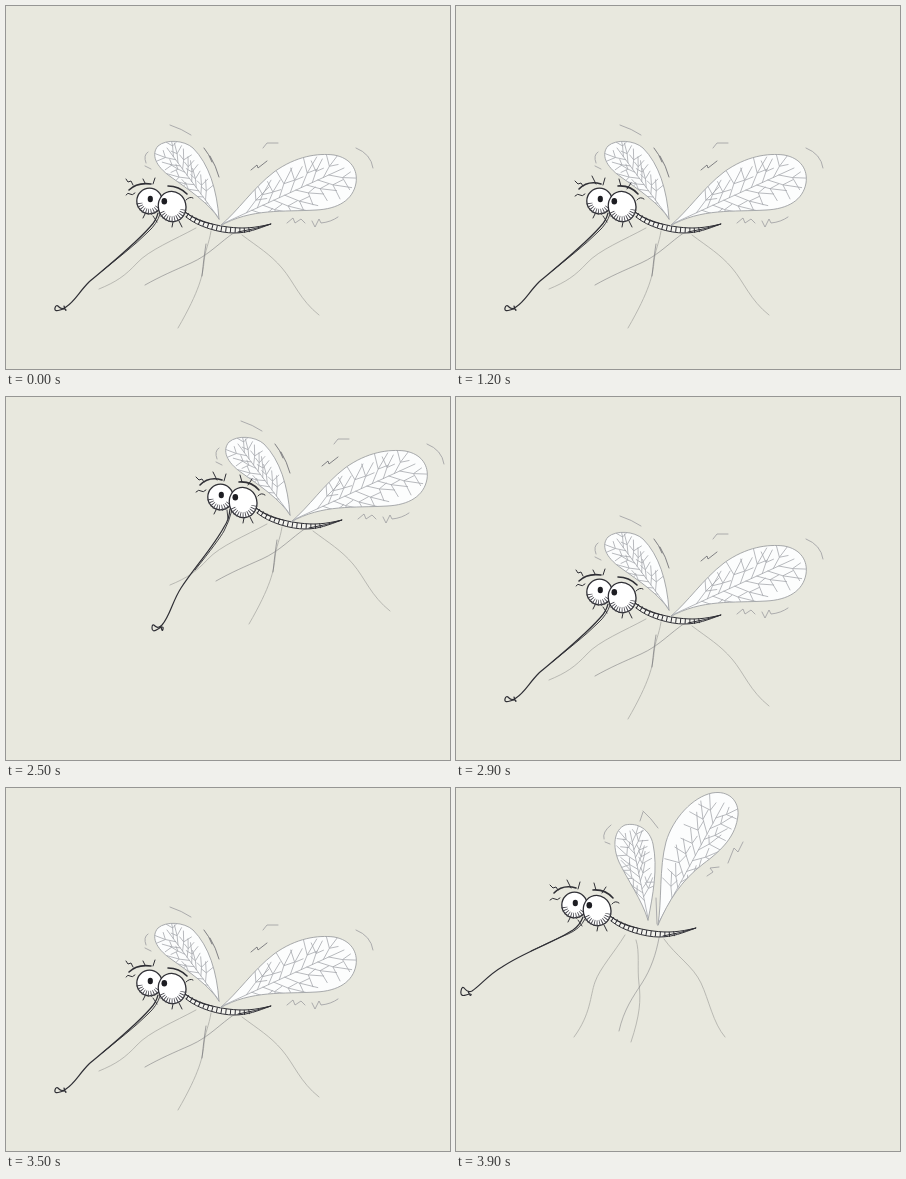
These frames come from a looping animation (444 px wide and 363 px high, 4100 ms). An HTML page:

```html
<!DOCTYPE html>
<html lang="en">
<head>
<meta charset="utf-8">
<title>Mosquito</title>
<style>
html, body { margin: 0; width: 100%; height: 100%; overflow: hidden; background: #e8e8de; }
svg { display: block; width: 444px; height: 363px; }
path, ellipse { fill: none; stroke: #2f2f35; stroke-width: 1; stroke-linecap: round; stroke-linejoin: round; }
.wing { fill: #fcfdfd; stroke: #94969a; stroke-width: .8; }
.vein { stroke: #a6a9ae; stroke-width: .8; }
.leg { stroke: #adada8; stroke-width: .8; }
.mark { stroke: #9c9ca0; stroke-width: .8; }
.dark { stroke: #66666c; }
.body { fill: #f3f3ee; }
.rings { stroke-width: 5; stroke-dasharray: 1 3.6; stroke-linecap: butt; }
.nose path { stroke-width: 1.2; }
.nose .thin { stroke-width: .9; }
.eye { fill: #fff; stroke-width: 1.3; }
.pupil { fill: #1d1d22; stroke: none; }
.shade { stroke-width: 6; stroke-dasharray: .9 1.7; stroke-linecap: butt; stroke: #4a4a50; }
.brow { stroke-width: 1.6; }
.hair { stroke-width: 1; }

#fly, #spread, .up, .noseA, .noseC, #headA, #headB { animation: 4.1s step-end infinite; }
#fly { animation-name: fly; }
#spread { animation-name: spread; }
.up { animation-name: up; }
.noseA { animation-name: noseA; }
.noseC { animation-name: noseC; }
#headA { animation-name: headA; }
#headB { animation-name: headB; }

@keyframes fly {
  0%, 70.731%, 85.365%, 100% { transform: translate(0, 0); }
  60.975%, 75.609%, 90.243% { transform: translate(71px, -95px); }
  65.853%, 80.487%, 95.121% { transform: translate(-25px, -78px); }
}
@keyframes spread {
  0%, 60.975%, 70.731%, 85.365% { opacity: 1; }
  36.585%, 65.853%, 80.487%, 95.121%, 100% { opacity: 0; }
}
@keyframes up {
  0%, 60.975%, 70.731%, 85.365% { opacity: 0; }
  36.585%, 65.853%, 80.487%, 95.121%, 100% { opacity: 1; }
}
@keyframes noseA {
  0%, 14.634%, 29.268%, 70.731%, 85.365% { opacity: 1; }
  7.317%, 21.951%, 36.585%, 75.609%, 90.243%, 100% { opacity: 0; }
}
@keyframes noseC {
  0%, 14.634%, 29.268%, 65.853%, 80.487%, 95.121%, 100% { opacity: 0; }
  7.317%, 21.951%, 60.975%, 75.609%, 90.243% { opacity: 1; }
}
@keyframes headA {
  0%, 14.634%, 70.731%, 85.365% { opacity: 1; }
  7.317%, 21.951%, 75.609%, 90.243%, 100% { opacity: 0; }
}
@keyframes headB {
  0%, 14.634%, 70.731%, 85.365% { opacity: 0; }
  7.317%, 21.951%, 75.609%, 90.243%, 100% { opacity: 1; }
}
</style>
</head>
<body>
<svg viewBox="0 0 444 363">
<g id="fly">
  <path class="body" d="M179 206C190 214 206 219 222 221S248 222 265 218C251 223 242 227 228 227S192 221 180 211"/>
  <path class="rings" d="M181 209C194 218 210 223 227 224Q238 225 247 223"/>
  <path stroke-width="1.4" d="M179 206C188 213 196 216 206 218M232 226Q250 223 265 218"/>

  <g id="spread">
    <path class="leg" d="M190 222C168 234 143 244 131 257S110 276 93 283"/>
    <path class="leg dark" stroke-opacity=".6" d="M229 226C214 236 203 249 185 257S155 270 139 279"/>
    <path class="leg" d="M205 225C203 238 199 244 198 256S194 284 172 322"/>
    <path class="leg dark" stroke-opacity=".7" d="M200 238Q198 250 196 270"/>
    <path class="leg" d="M236 229C252 241 264 248 276 262S294 294 313 309"/>
    <path class="mark" d="M164 119Q176 123 185 129M142 146Q137 149 140 157M139 160l6 3M257 142l4-5h11M350 142Q365 148 367 162M281 217l6-5 2 5 6-4 4 4M306 215l3 6 4-8 2 4Q325 216 332 211"/>
    <path class="mark dark" d="M198 142Q203 148 206 156M204 150Q210 160 213 171M245 164l6-5 1 3 9-7"/>
  </g>
  <g class="up">
    <path class="leg" d="M194 225C183 243 169 258 164 272S160 304 143 327"/>
    <path class="leg" d="M205 230C209 242 206 258 208 274S209 305 200 332"/>
    <path class="leg dark" stroke-opacity=".55" d="M228 228C225 244 220 259 211 273S193 299 188 321"/>
    <path class="leg" d="M233 229C245 246 262 256 270 273S282 313 294 327"/>
    <path class="mark" d="M283 67Q299 62 309 72M312 132l-5 10-4-4-6 15M288 157l-9 1 3 4-6 4M212 101Q220 108 227 118M212 102l-3 9M180 115Q171 122 173 129M174 132l5 2"/>
    <path class="mark" d="M225 188L226 214"/>
  </g>

  <g class="nose">
    <g class="noseA">
      <path d="M152 207Q150 215 144 221C127 240 102 260 83 276C73 286 69 295 60 301Q56 304 53 301T49 302T54 304T60 304T58 300"/>
      <path class="thin" d="M154 208Q151 218 142 226C128 240 112 252 96 265M147 210l4 6"/>
    </g>
    <g class="up">
      <path d="M152 207Q149 215 142 220C122 233 93 242 71 257C57 265 49 276 41 281Q37 283 34 279T30 281T35 285T40 285T37 281"/>
      <path class="thin" d="M154 209Q149 219 137 224T100 241M147 210l4 6"/>
    </g>
    <g class="noseC">
      <path d="M153 207Q152 218 147 225C137 244 117 266 104 286C95 300 93 314 85 323Q81 327 78 324T75 326T81 327T86 327T84 324"/>
      <path class="thin" d="M155 208Q152 220 147 229T118 268M150 208l1 9"/>
    </g>
  </g>

  <ellipse class="eye" cx="143.5" cy="195" rx="12.7" ry="12.8"/>
  <path class="shade" d="M133.5 197A10 10 0 0 0 152 201"/>
  <ellipse class="eye" cx="166" cy="200.5" rx="13.8" ry="15.2" transform="rotate(-12 166 200)"/>
  <path class="shade" d="M155.5 206A11.5 12 0 0 0 177.5 202"/>
  <ellipse class="pupil" cx="144.3" cy="193" rx="2.6" ry="3.2"/>
  <ellipse class="pupil" cx="158.3" cy="195.2" rx="2.8" ry="3.3"/>
  <path class="hair" d="M167 216l-1 5M173 215l3 6M139 208l-2 4"/>
  <g id="headA">
    <path class="brow" d="M123 184Q131 176 145 178M162 180Q173 180 181 188"/>
    <path class="hair" d="M120 173l2 3 3-1 2 4M120 189q2-3 4-1t5-1M137 173l2 4M149 172l-2 6M180 194q4-4 7-2"/>
  </g>
  <g id="headB">
    <path class="brow" d="M123 183Q132 174 145 178M162 180Q174 179 182 188"/>
    <path class="hair" d="M119 175l3 3 3-1 2 3M119 190q3-3 5-1t5-1M136 170l4 8M149 172l-2 7M163 173l2 7M175 177l-4 6M181 194q3-4 7-1"/>
  </g>
</g>
</svg>
<script>
const NS = 'http://www.w3.org/2000/svg';
let seed = 7;
const rand = () => (seed = seed * 16807 % 2147483647) / 2147483647;

function add(parent, tag, attrs) {
  const el = document.createElementNS(NS, tag);
  for (const k in attrs) el.setAttribute(k, attrs[k]);
  return parent.appendChild(el);
}

// Midrib with long side veins that fork before they reach the rim.
function veins(x0, y0, x1, y1, width) {
  const angle = Math.atan2(y1 - y0, x1 - x0);
  const at = (x, y, a, r) => [x + r * Math.cos(a), y + r * Math.sin(a)];
  const fix = p => p.map(v => v.toFixed(1)).join(' ');
  let d = `M${x0} ${y0}L${x1} ${y1}`;
  for (let i = 0; i < 16; i++) {
    const t = .2 + .045 * i, side = i % 2 ? 1 : -1;
    const p = [x0 + (x1 - x0) * t, y0 + (y1 - y0) * t];
    const a = angle + side * (.5 + .35 * rand());
    const r = width * (.95 + .4 * rand());
    const mid = at(...p, a, r * .5);
    const end = at(...mid, a - side * .15, r * .6);
    const out = at(...mid, a + side * (.6 + .4 * rand()), r * .5);
    const back = at(...mid, a - side * (.7 + .4 * rand()), r * .35);
    d += `M${fix(p)}L${fix(mid)}L${fix(end)}M${fix(out)}L${fix(mid)}L${fix(back)}`;
  }
  return d;
}

function wing(parent, id, d, ...axis) {
  add(add(parent, 'clipPath', { id }), 'path', { d });
  add(parent, 'path', { d, class: 'wing' });
  add(parent, 'path', { d: veins(...axis), class: 'vein', 'clip-path': `url(#${id})` });
}

const spread = document.querySelector('#spread');
const up = document.querySelector('.up');
wing(spread, 'w1', 'M214 220C233 204 246 183 268 166C290 150 312 147 328 149C345 152 352 164 350 177C347 194 332 203 310 204C278 206 245 202 214 220Z', 216, 218, 338, 162, 24);
wing(spread, 'w2', 'M213 213C203 197 183 184 165 171C149 160 145 148 152 140C160 133 178 134 187 142C203 158 211 184 213 213Z', 212, 211, 161, 142, 16);
wing(up, 'w3', 'M227 215C231 191 228 158 235 132C242 108 262 87 281 83C298 80 308 91 307 105C305 126 291 140 272 154C250 171 238 190 227 215Z', 228, 212, 293, 93, 23);
wing(up, 'w4', 'M217 210C211 190 196 169 188 152C181 136 183 120 194 115C207 112 219 120 222 134C227 158 222 185 217 210Z', 217, 208, 199, 121, 17);
</script>
</body>
</html>
```
